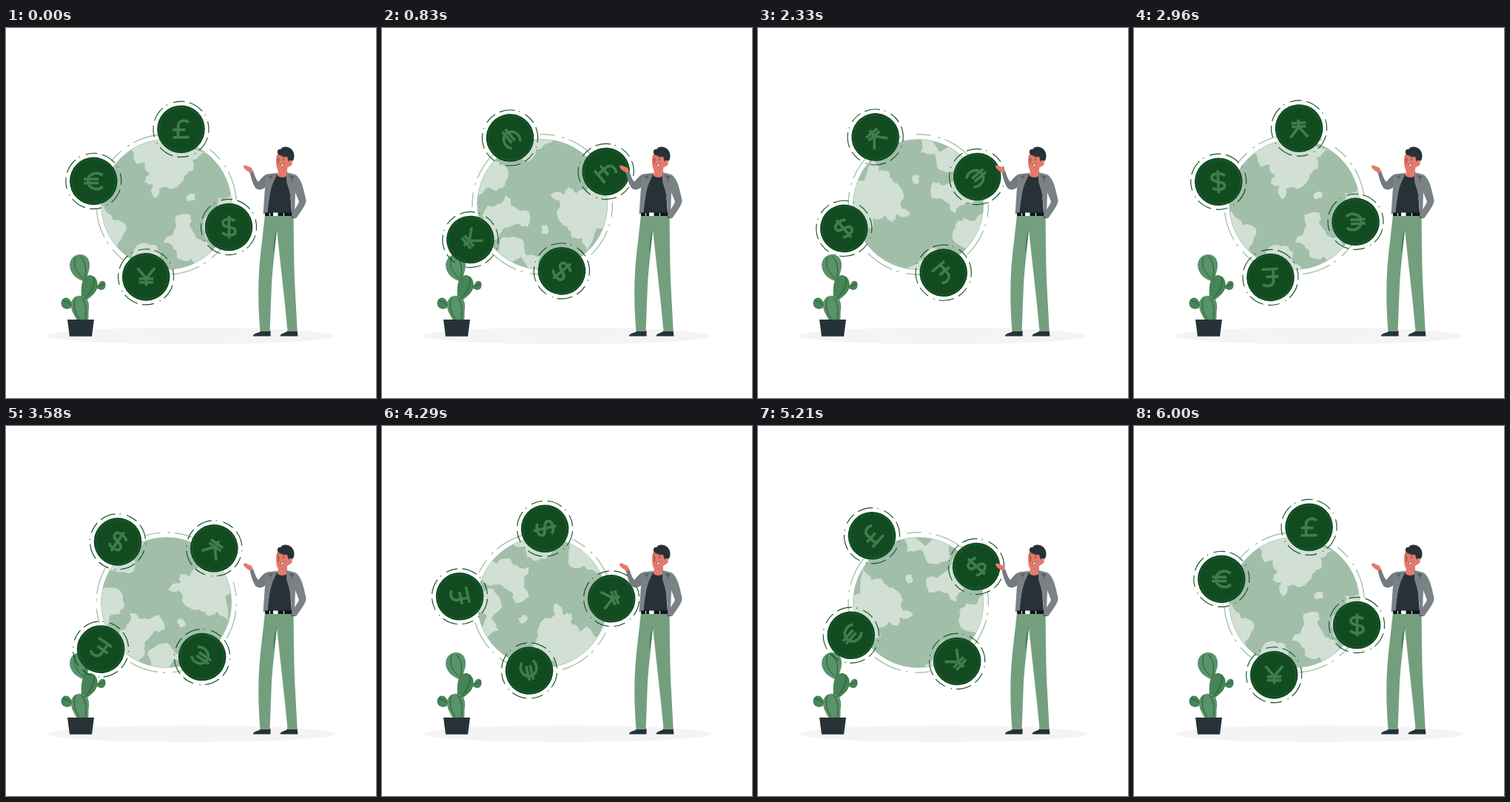
Recreate the animation shown at these times as an HTML page. Size 500x500 px, loop 6.04 s.

```html
<!DOCTYPE html>
<html lang="en">
<head>
<meta charset="utf-8">
<title>World currencies</title>
<style>
html, body { margin: 0; width: 100%; height: 100%; overflow: hidden; background: #fff; }
svg { display: block; width: 100vw; height: 100vh; }
.line { fill: none; }
.vein { fill: none; stroke: #215c33; stroke-width: 1; stroke-linecap: round; }
</style>
</head>
<body>
<svg viewBox="0 0 500 500">
  <defs><clipPath id="disc"><circle cx="216.7" cy="238.5" r="88.2"/></clipPath></defs>
  <ellipse cx="249.5" cy="416" rx="194" ry="11.3" fill="#f4f4f4"/>

  <g id="cactus" fill="#5a9269">
    <path d="M104 342C93 338 86 330 86 320C87 311 93 306 100 306C108 306 113 312 113 320C113 329 109 336 108 342Z"/>
    <g fill="#468356">
      <path d="M103 371C101 361 101 349 104 340C108 333 116 332 121 338C126 345 124 355 117 361C111 366 108 369 103 371Z"/>
      <path d="M121 349L125 347C126 342 132 340 134 344C136 349 133 354 129 354C126 354 124 352 121 351Z"/>
      <path d="M89 375C88 379 84 381 79 379C74 377 73 370 77 366C81 363 86 365 88 370L91 372Z"/>
    </g>
    <path d="M96 395C92 388 87 381 88 372C89 365 95 361 102 362C110 363 113 371 112 379C111 386 112 390 111 395Z"/>
    <g class="vein">
      <path d="M94 310C90 320 95 331 104 338M101 309C108 317 109 329 106 337"/>
      <path d="M119 337C121 348 114 359 105 367"/>
      <path d="M125 348Q130 349 133 345M77 368Q83 369 88 374"/>
      <path d="M94 364C90 374 93 385 99 393M102 364C109 373 109 384 107 393"/>
    </g>
    <path d="M83 394H119L116 416.800H86Z" fill="#263238"/>
  </g>

  <g id="orbit"></g>
  <g clip-path="url(#disc)">
    <circle cx="216.7" cy="238.5" r="88.2" fill="#a1bea9"/>
    <g id="land" fill="#d1dfd5"></g>
  </g>
  <circle cx="216.7" cy="238.5" r="88" class="line" stroke="#a1bea9" stroke-width=".6"/>
  <g id="coins"></g>

  <g id="man">
    <path d="M334 416.500C334 412 341 413 345 409H357.500V416.500ZM370.500 416.500C371 412 377 413 381 409H393.500L394.500 416.500Z" fill="#263238"/>
    <path d="M350 252H388.500C389 286 389 325 391 360L393.700 410H380.500C377 370 371 320 366 273C364 294 361 318 359 345L356.500 410H343.500C340 367 341 337 343.500 310Z" fill="#739f7f"/>
    <path d="M366 271C362 281 361 291 361.500 304L363 298Z" fill="#527c5e"/>
    <path d="M385 250L395 248L393 255Q391 259 385 256Z" fill="#586166"/>
    <path d="M358 197L352 213C348 219 341 220 337 216C333 210 331 201 329.500 195L334 193C336 199 338 205 341 208C346 202 350 197 356 197Z" fill="#737b7f"/>
    <path d="M330 196C327 193 323 192 321 188C320 186 323 185 325 186L332 189L334 194Z" fill="#e37a6c"/>
    <path d="M361 198L382 197L386 250H352Z" fill="#263238"/>
    <path d="M368 190L380 189L380 200Q373 204 367 200Z" fill="#e37a6c"/>
    <path d="M367 196C361 196 355 197 351 201L347.500 251H353.500C355 232 357 216 363 205ZM379 195L391 198C399 203 402 216 405.500 233C406 238 398 249 392 257L386 255L387 250C391 244 394 239 396 235L391 222L390 250H386C386 233 383 218 379 208Z" fill="#7a8285"/>
    <path d="M354 200L361 199L355 210L358 204ZM382 199L390 200L384 210L386 204Z" fill="#586166"/>
    <path d="M350 249.500H386V254H350Z" fill="#101719"/>
    <path d="M361 249.500H367.500V254H361ZM356 250H357V254H356ZM375 250H376V254H375Z" fill="#fff"/>
    <path d="M366 171C364 180 365 190 368 193C373 196 378 193 381 188C387 187 389 180 384 178L381 171Z" fill="#e37a6c"/>
    <path d="M368 171C365 167 368 163 371 164C373 160 378 160 381 161C387 163 391 169 389 177L387 180Q383 177 382 181L380 174Q373 174 368 171Z" fill="#263238"/>
    <path d="M370.500 185Q373 185 375.500 183Q376 187 373 187.500Z" fill="#fff" stroke="#7d2f32" stroke-width=".7"/>
    <path d="M367 175L369 174M373 174L377 175M369 178L367.500 182H369.500" class="line" stroke="#7d3037" stroke-width=".8"/>
    <circle cx="368" cy="177.500" r=".8" fill="#263238"/><circle cx="375" cy="178" r=".8" fill="#263238"/>
  </g>
</svg>
<script>
const LOOP = 6040, FPS = 24, TURN = 6000, START_ANGLE = -.4;
const HUB = "208.3 236.3", GLOBE = "216.7 238.5";
const byId = id => document.getElementById(id);

function seeded(seed) {
  return () => (seed = seed * 16807 % 2147483647) / 2147483647;
}

// Midpoint displacement turns a few headlands into a ragged coastline.
function coast(outline, i) {
  const random = seeded(i + 41);
  let points = outline.split(" ").map(s => s.split(",").map(Number));
  for (let level = 0; level < 2; level++) {
    points = points.flatMap(([x, y], n) => {
      const [u, v] = points[(n + 1) % points.length];
      const bend = (random() - .5) * .45;
      return [[x, y], [(x + u) / 2 + (y - v) * bend, (y + v) / 2 + (u - x) * bend]];
    });
  }
  return `<path d="M${points.map(p => p.map(c => c.toFixed(1)).join(" ")).join("L")}Z"/>`;
}

const lands = [
  "158,160 176,184 188,182 194,196 187,208 199,212 201,230 207,217 236,210 241,200 254,190 252,178 272,170 215,130",
  "243,228 256,226 255,233 246,234",
  "308,220 286,229 288,248 268,257 269,282 277,286 305,290",
  "213,290 225,280 229,254 250,253 248,268 256,282 269,288 276,306 250,335 250,312 231,311 225,294",
  "120,238 137,250 157,262 162,274 155,287 152,303 120,310",
  "174,298 194,293 210,303 209,318 222,335 178,335"
];
byId("land").innerHTML = lands.map(coast).join("");

// A dash motif that fills a quarter turn and repeats four times.
const dashedRing = (r, motif, from, color, width) =>
  `<circle r="${r}" pathLength="360" class="line" stroke="${color}" stroke-width="${width}"
    stroke-dasharray="${motif}" transform="rotate(${from - 90})"/>`;

byId("orbit").innerHTML = `<g transform="translate(${GLOBE})">
  ${dashedRing(94.7, "24 10 20 12 12 6 2 4", 62, "#a5c2ae", 1.4)}</g>`;

const signs = [
  ["237.2 137", "M10.500 -9C5 -13.500 -4 -12 -4 -3.500V11M-11 .8H6M-11 11H11"],
  ["118.5 206.2", "M12.500 -7.500C5 -14 -7.500 -10 -7.500 0C-7.500 10 5 14 12.500 7.500M-13 -2.700H7M-13 2.700H7"],
  ["188.5 336.2", "M-11.500 -12L.3 2L12 -12M.3 1V12M-9.500 2.400H10M-9.500 7.300H10"],
  ["300.8 269.6", "M8.500 -8C4 -12 -8 -12 -8 -5.500C-8 2 9 -2 9 5.800C9 12.500 -4 12.500 -9 7.500M.4 -15.500V15.500"]
];
byId("coins").innerHTML = signs.map(([place, sign]) => `
  <g transform="translate(${place})">
    ${dashedRing(37.6, "32 9 2 13 24 10", 18, "#14532a", 1.15)}
    <circle r="32.3" fill="#0e441b"/>
    <circle r="31" fill="#16562a"/>
    <circle r="28.8" fill="#124b20"/>
    <path d="${sign}" class="line" stroke="#3c7f4b" stroke-width="3.7"/>
  </g>`).join("");

const spin = (id, angle, center) =>
  byId(id).setAttribute("transform", `rotate(${angle} ${center})`);

function draw(t) {
  const frame = Math.floor((t + 6) * FPS / 1000);
  const turn = frame * 360000 / FPS / TURN;
  spin("coins", turn + START_ANGLE, HUB);
  spin("orbit", turn, GLOBE);
  spin("land", turn * 2, GLOBE);
}

const start = performance.now();
function tick(now) {
  draw(Math.max(0, now - start) % LOOP);
  requestAnimationFrame(tick);
}
draw(0);
requestAnimationFrame(tick);
</script>
</body>
</html>
```
